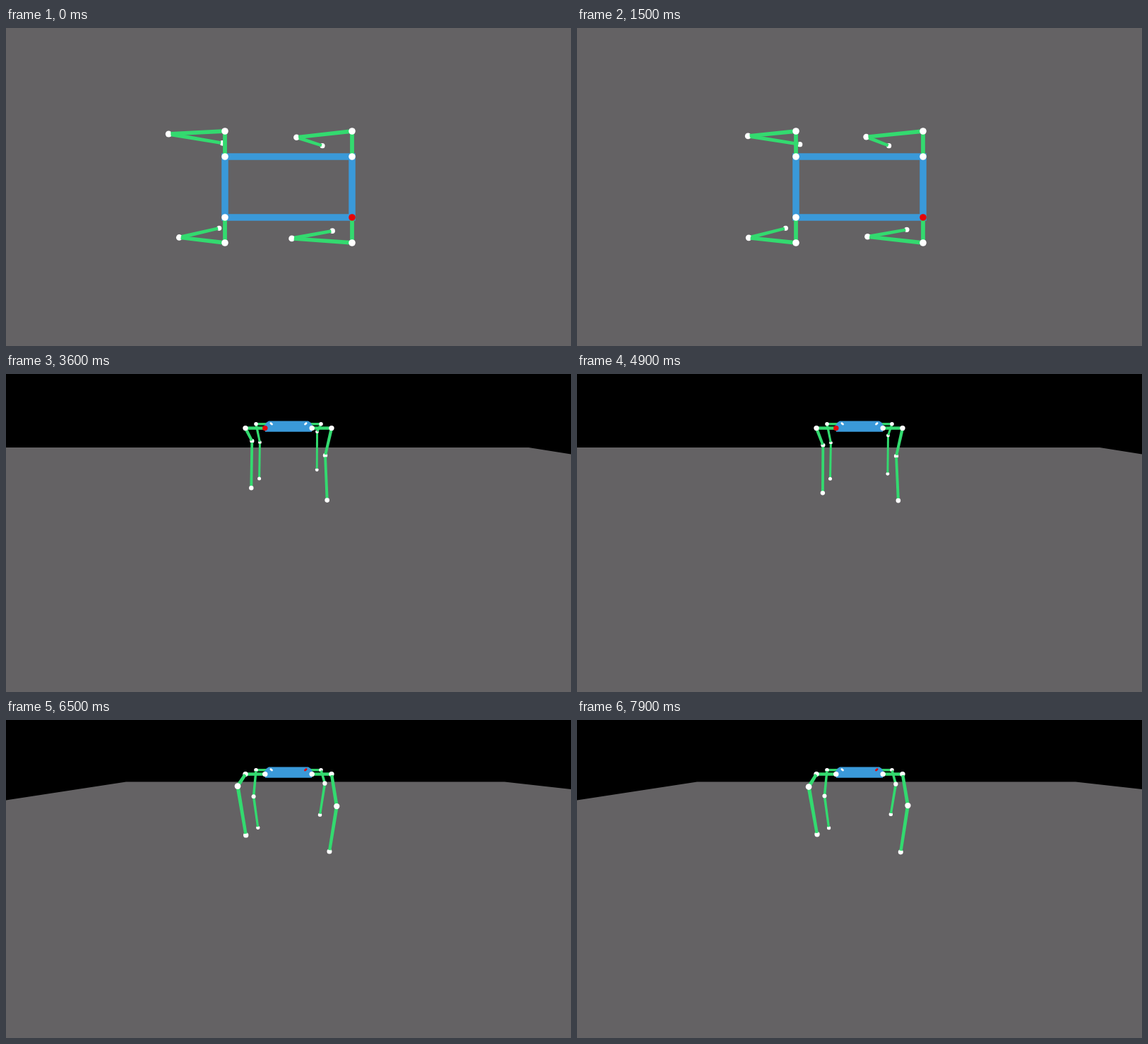
These frames come from a looping animation (800 px wide and 450 px high, 8 s). An HTML page with a canvas:

```html
<!DOCTYPE html>
<html lang="en">
<head>
<meta charset="utf-8">
<title>Walking robot</title>
<style>
html, body { margin: 0; width: 100%; height: 100%; overflow: hidden; background: #646264; }
canvas { display: block; width: 800px; height: 450px; }
</style>
</head>
<body>
<canvas id="stage" width="800" height="450"></canvas>
<script>
const ctx = document.getElementById('stage').getContext('2d');
const LOOP = 8000, STEP = 100;
const GREY = '#646264', BLUE = '#3a99d9', GREEN = '#33da6f', WHITE = '#fff', RED = '#e60505';

// World units: x forward, y to the robot's right, z down from the body.
const FOCAL = 390, HALF_LEN = 90, HALF_WID = 43, HIP = 79;
const UPPER = 91, LOWER = 104, STAND = 138, LIFT = 35, REACH = 18;
const HALF_CYCLE = 0.67, GAIT_START = 0.875;
const PITCH = 23.8 * Math.PI / 180, CAM_DIST = 630, CAM_UP = 28;
const DOT_R = 4.8, LINK_W = 5.8;

const legs = [
  { end: 1, side: -1, lag: 0 },
  { end: 1, side: 1, lag: 1, red: true },
  { end: -1, side: -1, lag: 1 },
  { end: -1, side: 1, lag: 0 }
];

const views = [
  { until: 2100, dir: 0 },
  { until: 5200, dir: 1, ground: [[0, 104], [740, 104], [800, 113.5]] },
  { until: LOOP, dir: -1, ground: [[0, 113.5], [170, 87.5], [706, 87.5], [800, 98]] }
];

function project([x, y, z], dir) {
  if (!dir) {
    const s = FOCAL / (FOCAL + z);
    return { x: 400 + x * s, y: 225 + y * s, s, depth: FOCAL + z };
  }
  const dist = CAM_DIST - dir * x, drop = z + CAM_UP;
  const depth = dist * Math.cos(PITCH) + drop * Math.sin(PITCH);
  const v = drop * Math.cos(PITCH) - dist * Math.sin(PITCH);
  const s = FOCAL / depth;
  return { x: 400 - dir * y * s, y: 225 + v * s, s, depth };
}

// Feet slide straight back on the ground and return along half an ellipse.
function footAt(leg, sec) {
  const w = (((sec - GAIT_START) / HALF_CYCLE + leg.lag) % 2 + 2) % 2;
  const u = w < 1 ? 1 - 2 * w : 2 * w - 3;
  const lift = w < 1 ? 0 : LIFT * Math.sqrt(1 - u * u);
  return [(leg.end > 0 ? -18 : -36) + REACH * u, STAND - lift];
}

function joints(leg, sec) {
  const [fx, fz] = footAt(leg, sec);
  const d = Math.hypot(fx, fz);
  const bend = Math.acos((UPPER ** 2 + d * d - LOWER ** 2) / (2 * UPPER * d));
  const angle = Math.atan2(fx, fz) - bend;
  const x = leg.end * HALF_LEN, y = leg.side * HIP;
  return [
    [x, leg.side * HALF_WID, 0],
    [x, y, 0],
    [x + UPPER * Math.sin(angle), y, UPPER * Math.cos(angle)],
    [x + fx, y, fz]
  ];
}

function fillPoly(points, color) {
  ctx.fillStyle = color;
  ctx.beginPath();
  points.forEach(p => ctx.lineTo(p[0], p[1]));
  ctx.fill();
}

function drawDot(p, color) {
  ctx.fillStyle = color;
  ctx.beginPath();
  ctx.arc(p.x, p.y, DOT_R * p.s, 0, 7);
  ctx.fill();
}

function drawLink(a, b) {
  const len = Math.hypot(b.x - a.x, b.y - a.y) || 1;
  const nx = -(b.y - a.y) / len * LINK_W / 2, ny = (b.x - a.x) / len * LINK_W / 2;
  fillPoly([
    [a.x + nx * a.s, a.y + ny * a.s], [b.x + nx * b.s, b.y + ny * b.s],
    [b.x - nx * b.s, b.y - ny * b.s], [a.x - nx * a.s, a.y - ny * a.s]
  ], GREEN);
}

// Shortens a link so that it starts at the surface of its joint.
function trim(a, b) {
  const k = 3.6 / Math.hypot(...a.map((v, i) => b[i] - v));
  return a.map((v, i) => v + (b[i] - v) * k);
}

function drawLegs(list, sec, dir) {
  const items = [];
  for (const leg of list) {
    const j = joints(leg, sec);
    for (let i = 0; i < 3; i++) {
      const a = project(trim(j[i], j[i + 1]), dir), b = project(trim(j[i + 1], j[i]), dir);
      items.push({ depth: (a.depth + b.depth) / 2, draw: () => drawLink(a, b) });
    }
    j.forEach((pos, i) => {
      const p = project(pos, dir);
      items.push({ depth: p.depth - 0.01, draw: () => drawDot(p, leg.red && !i ? RED : WHITE) });
    });
  }
  items.sort((a, b) => b.depth - a.depth).forEach(item => item.draw());
}

function drawTop(sec) {
  ctx.fillStyle = GREY;
  ctx.fillRect(0, 0, 800, 450);
  ctx.strokeStyle = BLUE;
  ctx.lineWidth = 9.5;
  ctx.strokeRect(310, 182, 180, 86);
  drawLegs(legs, sec, 0);
}

function drawSliver(x, tilt, color) {
  ctx.fillStyle = color;
  ctx.beginPath();
  ctx.ellipse(x, 70.3, 2.6, 1.5, tilt, 0, 7);
  ctx.fill();
}

function drawEndOn(view, sec) {
  ctx.fillStyle = '#000';
  ctx.fillRect(0, 0, 800, 450);
  fillPoly([...view.ground, [800, 450], [0, 450]], GREY);
  drawLegs(legs.filter(l => l.end !== view.dir), sec, view.dir);
  fillPoly([[367, 81.7], [433, 81.7], [435, 74.5], [431, 68.5], [428, 66.5],
    [372, 66.5], [369, 68.5], [365, 74.5]], BLUE);
  drawSliver(375.7, 0.7, WHITE);
  drawSliver(424.3, -0.7, view.dir < 0 ? RED : WHITE);
  drawLegs(legs.filter(l => l.end === view.dir), sec, view.dir);
}

function render(now) {
  const t = Math.floor(now % LOOP / STEP) * STEP;
  const view = views.find(v => t < v.until);
  if (view.dir) drawEndOn(view, t / 1000);
  else drawTop(t / 1000);
}

const start = performance.now();
function tick() {
  render(performance.now() - start);
  requestAnimationFrame(tick);
}
tick();
</script>
</body>
</html>
```
